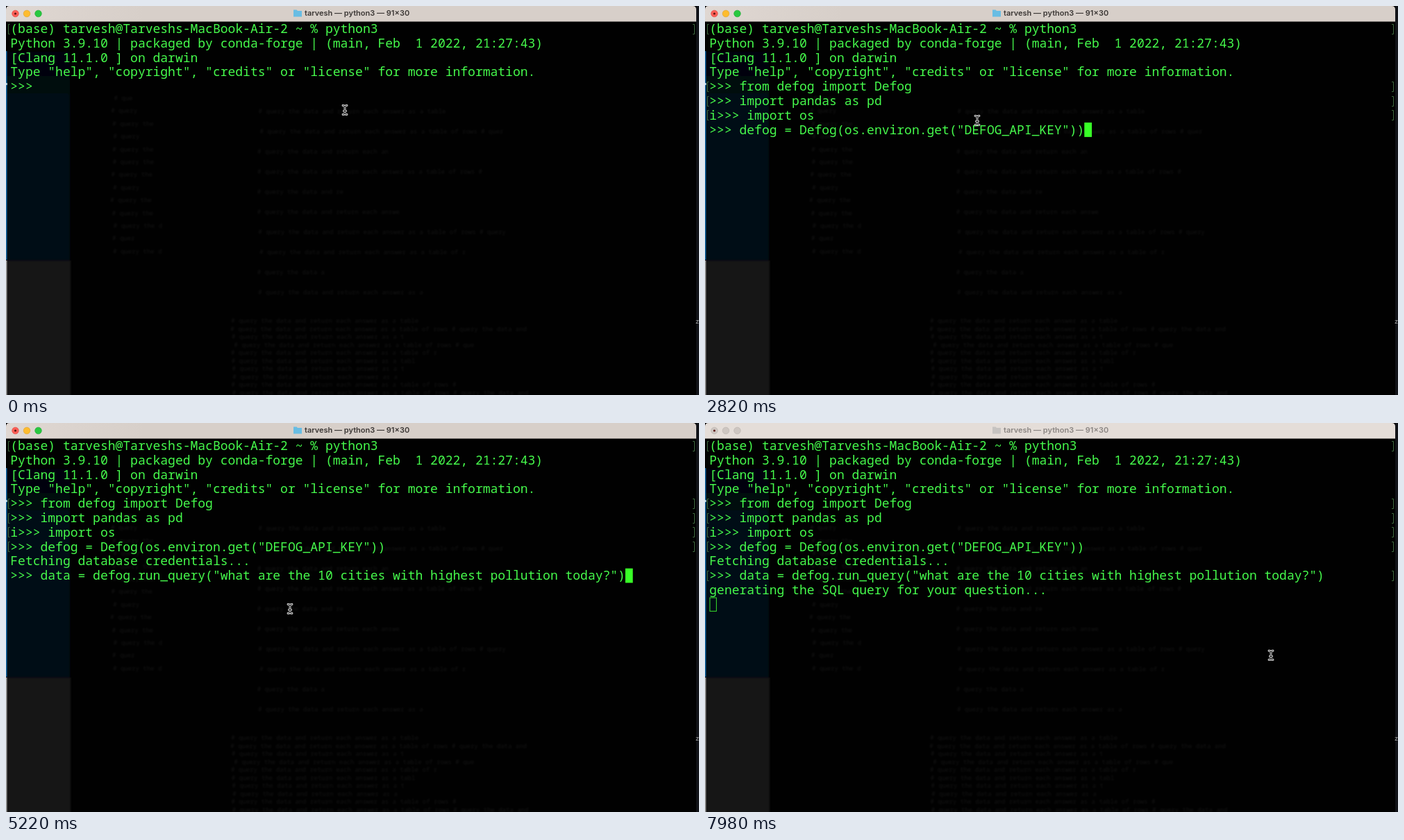
Animation, 998 px wide and 561 px high, one loop 8 s. Source, as an HTML page:

```html
<!DOCTYPE html>
<html lang="en">
<head>
<meta charset="utf-8">
<title>Terminal session</title>
<style>
  html, body { margin: 0; height: 100%; overflow: hidden; background: #000; }
  svg { display: block; width: 998px; height: 561px; }
  text { white-space: pre; }
  #rows { font: 500 18px "Noto Sans Mono", monospace; fill: #46fb4c; }
  #ghost { font: 9px "Noto Sans Mono", monospace; fill: #fff; opacity: .07; }
  #title { font: 600 11px Inter, sans-serif; fill: #3b3735; }
  #marks { fill: none; stroke: #3f6a3f; }
  #bar { fill: url(#chrome); }
  .idle #bar { fill: #e4ddd8; }
  .idle #title { fill: #8a8582; }
  .idle .light { fill: #cdc6c1; stroke: #b8b1ac; }
  .idle #folder { fill: #c6c3c1; }
</style>
</head>
<body>
<svg id="stage" viewBox="0 0 998 561">
  <defs>
    <linearGradient id="navy" x2="0" y2="1">
      <stop stop-color="#000206"/>
      <stop offset=".25" stop-color="#000b14"/>
    </linearGradient>
    <linearGradient id="chrome">
      <stop stop-color="#dfd7d2"/>
      <stop offset=".2" stop-color="#d7cfc9"/>
    </linearGradient>
    <filter id="soft"><feGaussianBlur stdDeviation="1.5"/></filter>
    <filter id="haze"><feGaussianBlur stdDeviation=".8"/></filter>
    <path id="beam" d="M-3 -6.5Q0 -6.5 0 -4.5Q0 -6.5 3 -6.5M0 -4.5V4.5M-3 6.5Q0 6.5 0 4.5Q0 6.5 3 6.5M-1.5 1.5H1.5"/>
  </defs>
  <rect width="998" height="561" fill="#010101"/>
  <g filter="url(#soft)">
    <rect x="-6" y="65" width="98" height="301" fill="url(#navy)"/>
    <rect x="-6" y="367" width="99" height="210" fill="#171717"/>
  </g>
  <rect y="65" width="1.5" height="301" fill="#1467a3"/>
  <rect y="367" width="1.5" height="194" fill="#9a9a9a"/>
  <rect y="111" width="2" height="3" fill="#a5c9dc"/>
  <g id="ghost" filter="url(#haze)"></g>
  <rect x="994" width="4" height="561" fill="#111318"/>
  <text x="993" y="458" font-family="Inter, sans-serif" font-size="9" fill="#aaa">z</text>

  <path id="bar" d="M0 22.5V5Q0 0 5 0H989Q994 0 994 5V22.5Z"/>
  <g stroke-width=".6">
    <circle class="light" cx="13.5" cy="11" r="4.8" fill="#fe5f57" stroke="#dd453e"/>
    <circle class="light" cx="30" cy="11" r="4.8" fill="#febc2e" stroke="#dc9f25"/>
    <circle class="light" cx="46.5" cy="11" r="4.8" fill="#28c840" stroke="#1ba731"/>
  </g>
  <circle cx="13.5" cy="11" r="1.6" fill="#5b1512"/>
  <path id="folder" d="M414 5.5H418.5L420 7H426V15.5H414Z" fill="#68bde3"/>
  <text id="title" x="430" y="14.3">tarvesh — python3 — 91×30</text>

  <path id="marks"/>
  <rect id="caret"/>
  <g id="rows"></g>
  <g id="mouse" fill="none" stroke-linecap="round">
    <use href="#beam" stroke="#e8e8e8" stroke-width="2.8"/>
    <use href="#beam" stroke="#111"/>
  </g>
</svg>
<script>
const LOOP = 8000, IDLE_AT = 5500;
const COL = 10.8, ROW = 20.8, LEFT = 6.3, TOP = 22.5;
const KEY = 27, BLINK = 600, TRAVEL = 320;
const $ = id => document.getElementById(id);

const print = (start, text) => ({ start, text, span: 0 });
const type = (start, text) => ({ start, text, span: text.length * KEY });

const SCRIPT = [
  print(-BLINK, `(base) tarvesh@Tarveshs-MacBook-Air-2 ~ % python3
Python 3.9.10 | packaged by conda-forge | (main, Feb  1 2022, 21:27:43)
[Clang 11.1.0 ] on darwin
Type "help", "copyright", "credits" or "license" for more information.
>>> `),
  type(500, 'from defog import Defog\n'),
  print(1200, '>>> '),
  type(1410, 'import pandas as pd\ni'),
  print(2160, '>>> i'),
  type(2220, 'mport os\n'),
  print(2500, '>>> '),
  print(2740, 'defog = Defog(os.environ.get("DEFOG_API_KEY"))'),
  print(3100, '\nFetching database credentials...\n'),
  print(4760, '>>> '),
  print(5140, 'data = defog.run_query("what are the 10 cities with highest pollution today?")'),
  print(5460, '\ngenerating the SQL query for your question...\n'),
];

// The pointer glides in from the right edge, rests, then hides
const RESTS = [
  { from: 0, to: 500, x: 488, y: 150 },
  { from: 2760, to: 3100, x: 392, y: 165 },
  { from: 4460, to: 4520, x: 975, y: 214 },
  { from: 5180, to: 5480, x: 409, y: 268 },
  { from: 7940, to: LOOP, x: 815, y: 335 },
];

function addText(parent, x, y, content = '') {
  const el = document.createElementNS('http://www.w3.org/2000/svg', 'text');
  el.setAttribute('x', x);
  el.setAttribute('y', y);
  el.textContent = content;
  return parent.appendChild(el);
}

// Faint window behind the terminal: lines of random length
let seed = 7;
const random = () => (seed = seed * 16807 % 2147483647) / 2147483647;
const FILLER = '# query the data and return each answer as a table of rows '.repeat(2);

function addGhost(x, top, bottom, step, shortest, longest) {
  for (let y = top; y < bottom; y += step) {
    const length = shortest + random() * (longest - shortest);
    addText($('ghost'), x + random() * 6, y, FILLER.slice(0, length));
  }
}
addGhost(150, 136, 360, 18.4, 5, 14);
addGhost(360, 155, 445, 29, 15, 70);
addGhost(323, 457, 565, 11.5, 25, 85);

const rows = Array.from({ length: 12 }, (_, i) => addText($('rows'), LEFT, TOP + i * ROW + 16.5));

function readScreen(t) {
  let screen = '', changed = 0;
  for (const { start, text, span } of SCRIPT) {
    if (t < start) break;
    const part = span ? Math.min(1, (t - start) / span) : 1;
    screen += text.slice(0, Math.floor(text.length * part));
    changed = Math.min(t, start + span);
  }
  return { lines: screen.split('\n'), changed };
}

function drawMarks(lines) {
  // Entered command lines get small brackets at both margins
  $('marks').setAttribute('d', lines.slice(0, -1).map((line, i) => {
    const y = Math.round(TOP + i * ROW) + 3.5;
    return />>>| % /.test(line) ? `M5.5 ${y}H3.5v14h2M989 ${y}h2.5v14h-2.5` : '';
  }).join(''));
}

function drawCaret(t, lines, changed, idle) {
  const last = lines.length - 1, inset = idle ? .7 : 0;
  const on = t - changed < 400 || t % BLINK >= BLINK / 2;
  const attrs = {
    x: LEFT + lines[last].length * COL + inset,
    y: TOP + last * ROW + inset,
    width: COL - 2 * inset,
    height: ROW - 2 * inset,
    fill: on && !idle ? '#38fe27' : 'none',
    stroke: idle ? '#38e02c' : 'none',
  };
  for (const name in attrs) $('caret').setAttribute(name, attrs[name]);
}

function drawMouse(t) {
  const rest = RESTS.find(r => t >= r.from - TRAVEL && t < r.to);
  $('mouse').setAttribute('visibility', rest ? 'visible' : 'hidden');
  if (!rest) return;
  const left = Math.max(0, (rest.from - t) / TRAVEL);
  const ease = left * left * (3 - 2 * left);
  $('mouse').setAttribute('transform', `translate(${rest.x + (998 - rest.x) * ease} ${rest.y})`);
}

function render(t) {
  const { lines, changed } = readScreen(t);
  const idle = t >= IDLE_AT;
  $('stage').classList.toggle('idle', idle);
  rows.forEach((row, i) => row.textContent = lines[i] || '');
  drawMarks(lines);
  drawCaret(t, lines, changed, idle);
  drawMouse(t);
}

const began = performance.now();
function tick() {
  render((performance.now() - began) % LOOP);
  requestAnimationFrame(tick);
}
tick();
</script>
</body>
</html>
```
